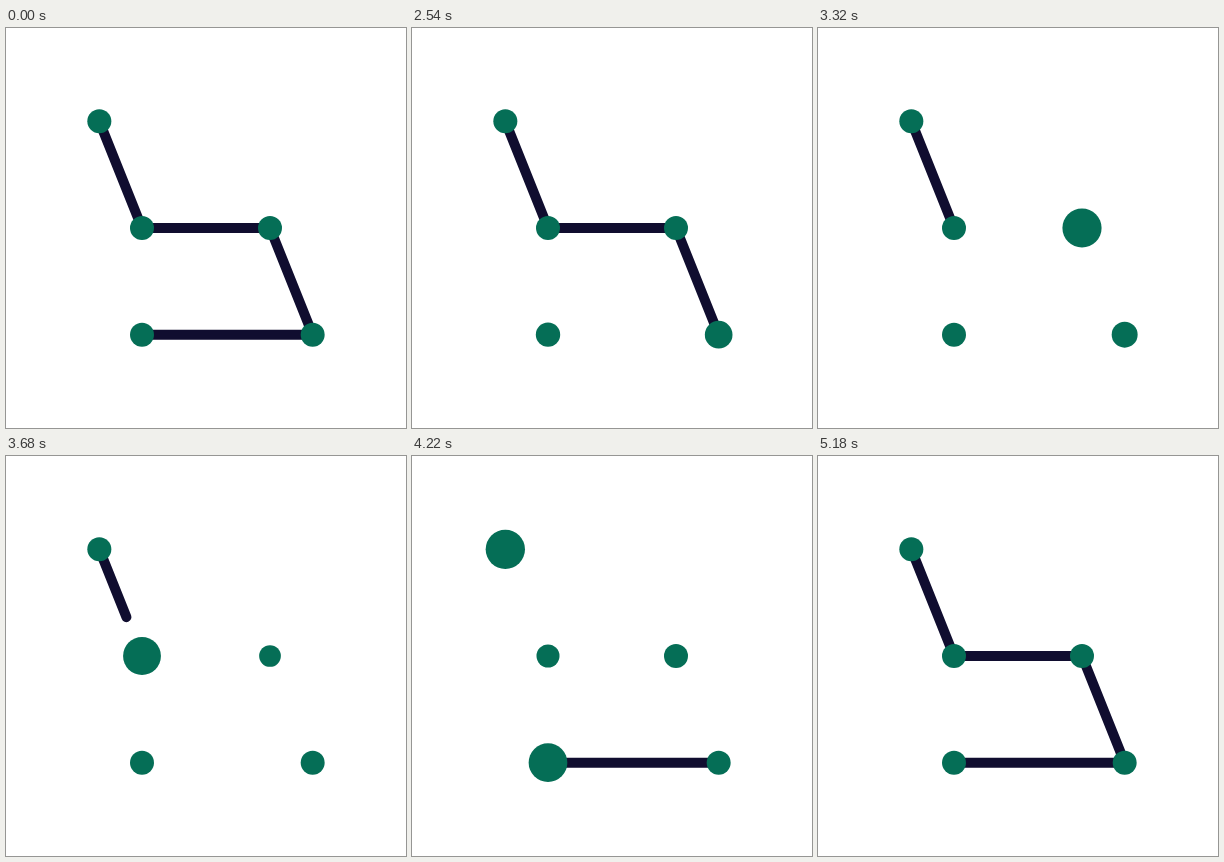
An HTML page with a canvas that plays this animation: 400 by 400 pixels, repeating every 5.27 s.

```html
<!DOCTYPE html>
<html lang="en">
<head>
<meta charset="utf-8">
<title>Connected dots</title>
<style>
  html, body { margin: 0; width: 100%; height: 100%; overflow: hidden; background: #fff; }
  canvas { display: block; width: 400px; height: 400px; }
</style>
</head>
<body>
<canvas id="stage" width="400" height="400"></canvas>
<script>
const ctx = document.getElementById('stage').getContext('2d');
const LOOP = 5270, START = 2030, END = 5180, STEP = 30;
const LINE = '#100d2f', DOT = '#056e56';

const points = [[136, 306.67], [306.67, 306.67], [264, 200], [136, 200], [93.33, 93.33]];
const FIRST = 2000, GAP = 500, ERASE = 400, REDRAW = 4020, REDRAW_TIME = 1160;

const clamp = x => Math.min(1, Math.max(0, x));
const mix = (a, b, p) => a + (b - a) * p;
const sineOut = p => Math.sin(p * Math.PI / 2);
const sineInOut = p => (1 - Math.cos(p * Math.PI)) / 2;
const cubicInOut = p => p < 0.5 ? 4 * p ** 3 : 1 - 4 * (1 - p) ** 3;
const quadOut = p => 1 - (1 - p) ** 2;

// Dot radius over one pulse: [ms, radius]
const pulse = [[0, 12], [270, 20], [640, 10.6], [830, 13], [1170, 12]];

function radius(t) {
  if (t <= 0) return 12;
  for (let i = 1; i < pulse.length; i++) {
    const [t0, r0] = pulse[i - 1], [t1, r1] = pulse[i];
    if (t < t1) {
      const ease = i === 1 ? sineOut : sineInOut;
      return mix(r0, r1, ease((t - t0) / (t1 - t0)));
    }
  }
  return 12;
}

const lengths = points.slice(1).map(([x, y], i) =>
  Math.hypot(x - points[i][0], y - points[i][1]));
const total = lengths.reduce((a, b) => a + b, 0);

// Strokes the part of segment i between fractions a and b
function segment(i, a, b) {
  if (b - a < 0.001) return;
  const [x0, y0] = points[i], [x1, y1] = points[i + 1];
  ctx.beginPath();
  ctx.moveTo(mix(x0, x1, a), mix(y0, y1, a));
  ctx.lineTo(mix(x0, x1, b), mix(y0, y1, b));
  ctx.stroke();
}

function dot([x, y], r) {
  ctx.beginPath();
  ctx.arc(x, y, r, 0, Math.PI * 2);
  ctx.fill();
}

function draw(t) {
  const rest = t < START || t >= END;
  ctx.fillStyle = '#fff';
  ctx.fillRect(0, 0, 400, 400);
  ctx.strokeStyle = LINE;
  ctx.lineWidth = 10;
  ctx.lineCap = 'round';

  let drawn = total * quadOut(clamp((t - REDRAW) / REDRAW_TIME));
  lengths.forEach((len, i) => {
    if (rest) return segment(i, 0, 1);
    segment(i, cubicInOut(clamp((t - FIRST - i * GAP) / ERASE)), 1);
    segment(i, 0, clamp(drawn / len));
    drawn -= len;
  });

  ctx.fillStyle = DOT;
  points.forEach((p, i) => {
    const begin = i === 0 && t >= REDRAW ? REDRAW : FIRST + i * GAP;
    dot(p, rest ? 12 : radius(t - begin));
  });
}

const origin = performance.now();
function tick() {
  const t = (performance.now() - origin) % LOOP;
  draw(t < START ? 0 : START + Math.floor((t - START) / STEP) * STEP);
  requestAnimationFrame(tick);
}
tick();
</script>
</body>
</html>
```
